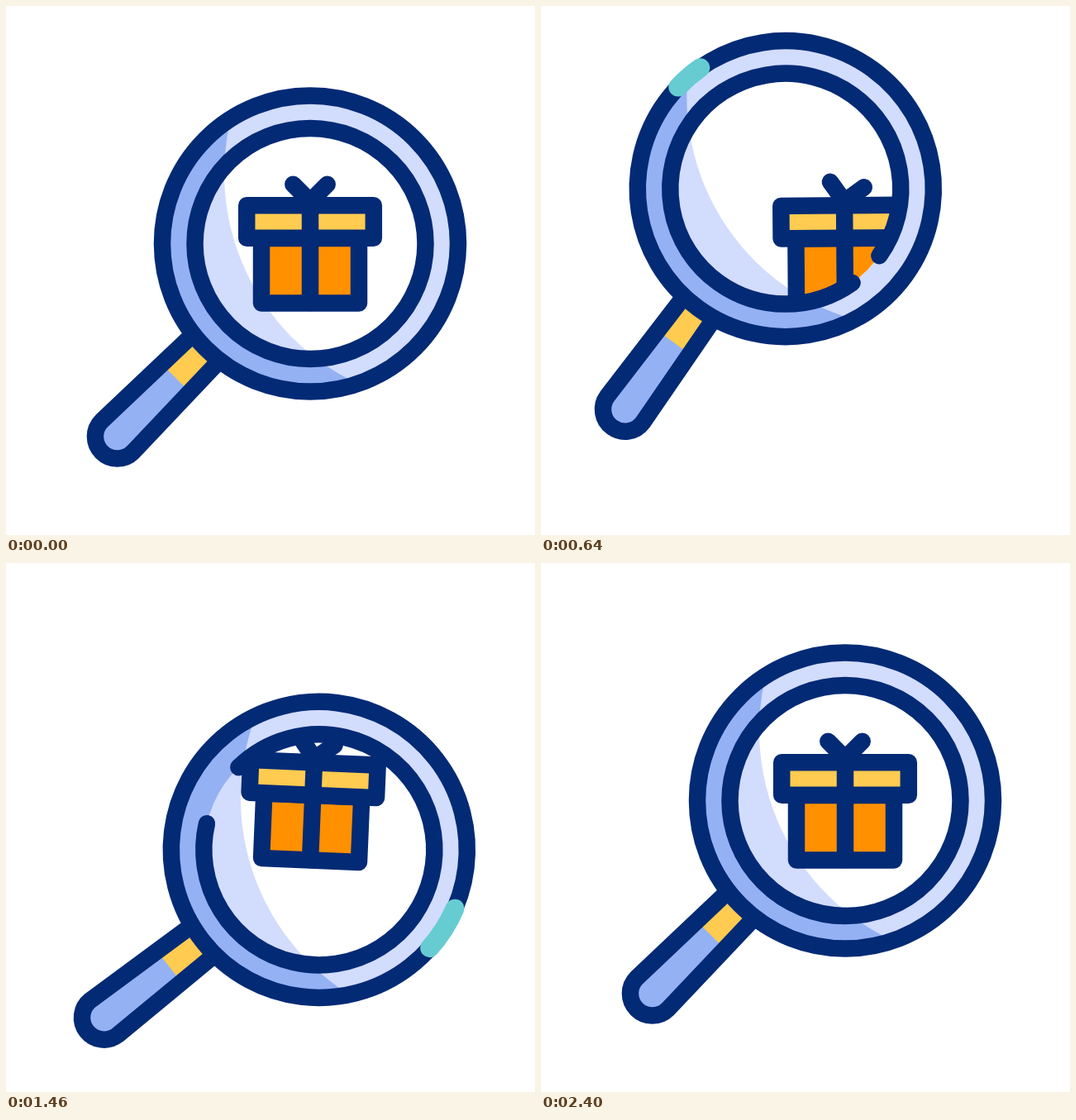
An HTML page with a canvas that plays this animation: 640x640 px, repeating every 2420 ms.

```html
<!DOCTYPE html>
<html lang="en">
<head>
<meta charset="utf-8">
<title>Gift search</title>
<style>
  html, body { margin: 0; height: 100%; overflow: hidden; background: #fff; }
  canvas { display: block; }
</style>
</head>
<body>
<canvas id="stage" width="640" height="640"></canvas>
<script>
const ctx = document.getElementById('stage').getContext('2d');
const NAVY = '#032a75', BLUE = '#94b1f3', PALE = '#d2dcfd', WHITE = '#fff';
const YELLOW = '#ffcb50', ORANGE = '#ff9000', TEAL = '#66ccd2';
const LOOP = 2420, LINE = 20.5, RIM = 179, LENS = 139.5;
const rad = deg => deg * Math.PI / 180;
const clamp = x => Math.min(1, Math.max(0, x));
const smooth = x => x * x * (3 - 2 * x);
const progress = (t, from, to) => smooth(clamp((t - from) / (to - from)));

// cubic-bezier(x1, 0, x2, 1)
function ease(x, x1, x2) {
  let lo = 0, hi = 1;
  for (let i = 0; i < 24; i++) {
    const s = (lo + hi) / 2, r = 1 - s;
    if (3 * x1 * s * r * r + 3 * x2 * s * s * r + s * s * s < x) lo = s; else hi = s;
  }
  return smooth((lo + hi) / 2);
}

// Smooth interpolation through [time, value] keys
function track(keys, t) {
  let value = keys[0][1];
  for (let i = 1; i < keys.length; i++)
    value += (keys[i][1] - keys[i - 1][1]) * progress(t, keys[i - 1][0], keys[i][0]);
  return value;
}

const glassPoses = [
  { x: 368, y: 287.5, turn: 0 },
  { x: 287, y: 213.5, turn: -10 },
  { x: 392, y: 369, turn: 10 },
  { x: 368, y: 287.5, turn: 0 }
];
const glassMoves = [
  { x1: .333, x2: .667, bend: [1.2, 0] },
  { x1: .333, x2: .833, bend: [4.8, 2] },
  { x1: .167, x2: .667, bend: [-1.5, 2] }
];
const giftKeys = [[0, 0], [433, 8], [867, -10], [1300, 8], [1733, -10], [2133, 0]];
const bowKeys = [[110, 0], [543, 12.3], [977, -12.3], [1410, 12.3], [1843, -12.3], [2243, 0]];

function glassPose(t) {
  const i = Math.min(2, Math.floor(t / 800));
  const a = glassPoses[i], b = glassPoses[i + 1], move = glassMoves[i];
  const f = ease(clamp(t / 800 - i), move.x1, move.x2), bulge = 4 * f * (1 - f);
  const mix = key => a[key] + (b[key] - a[key]) * f;
  return {
    x: mix('x') + move.bend[0] * bulge,
    y: mix('y') + move.bend[1] * bulge,
    turn: rad(mix('turn'))
  };
}

function group(draw) {
  ctx.save();
  draw();
  ctx.restore();
}

function disc(x, y, r, color) {
  ctx.beginPath();
  ctx.arc(x, y, r, 0, 2 * Math.PI);
  ctx.fillStyle = color;
  ctx.fill();
}

function stroke(color = NAVY, width = LINE) {
  ctx.strokeStyle = color;
  ctx.lineWidth = width;
  ctx.stroke();
}

function box(x, y, w, h, color) {
  ctx.beginPath();
  ctx.rect(x, y, w, h);
  ctx.fillStyle = color;
  ctx.fill();
  stroke();
}

function polyline(...points) {
  ctx.beginPath();
  points.forEach(p => ctx.lineTo(...p));
  stroke();
}

// Counterclockwise arc between two shares of a turn, measured from `origin` degrees
function arcStroke(r, origin, from, to, color, width) {
  ctx.beginPath();
  ctx.arc(0, 0, r, rad(origin - 360 * from), rad(origin - 360 * to), true);
  stroke(color, width);
}

function shadedDisc(r, shade, light) {
  group(() => {
    disc(0, 0, r, shade);
    ctx.clip();
    disc(177, -85, 281, light);
  });
}

function drawHandle() {
  group(() => {
    ctx.rotate(rad(45));
    ctx.beginPath();
    ctx.moveTo(-21.8, 150);
    ctx.lineTo(-26.7, 330);
    ctx.arc(0, 330, 26.7, Math.PI, 0, true);
    ctx.lineTo(21.8, 150);
    ctx.closePath();
    ctx.fillStyle = BLUE;
    ctx.fill();
    ctx.fillStyle = YELLOW;
    ctx.fillRect(-22, 150, 44, 80);
    stroke();
  });
}

function drawGift(t) {
  const turn = rad(track(giftKeys, t));
  ctx.translate(368, 360);
  ctx.rotate(turn);
  box(-59, -79, 118, 78.5, ORANGE);
  box(-76.8, -118.7, 153.6, 39.5, YELLOW);
  polyline([0, -118], [0, -1]);
  ctx.translate(0, -123.5);
  ctx.rotate(rad(track(bowKeys, t)) - turn);
  polyline([-20.7, -20.7], [0, 0], [20.7, -20.7]);
}

function draw(t) {
  const { x, y, turn } = glassPose(t);
  const onGlass = paint => group(() => {
    ctx.translate(x, y);
    ctx.rotate(turn);
    paint();
  });

  ctx.fillStyle = WHITE;
  ctx.fillRect(0, 0, 640, 640);
  ctx.lineCap = ctx.lineJoin = 'round';

  onGlass(() => {
    drawHandle();
    shadedDisc(RIM, BLUE, PALE);
    shadedDisc(LENS, PALE, WHITE);
  });

  group(() => {
    ctx.beginPath();
    ctx.arc(x, y, LENS, 0, 2 * Math.PI);
    ctx.clip();
    drawGift(t);
  });

  onGlass(() => {
    arcStroke(RIM, 0, 0, 1);
    const glintHead = progress(t, 267, 2133), glintTail = progress(t, 333, 2200);
    if (glintHead > glintTail) arcStroke(RIM, 270, glintTail, glintHead, TEAL, 23);
    const gapHead = progress(t, 225, 2095), gapTail = progress(t, 325, 2230);
    arcStroke(LENS, 90, gapHead, 1 + gapTail);
  });
}

function tick() {
  draw(performance.now() % LOOP);
  requestAnimationFrame(tick);
}
tick();
</script>
</body>
</html>
```
